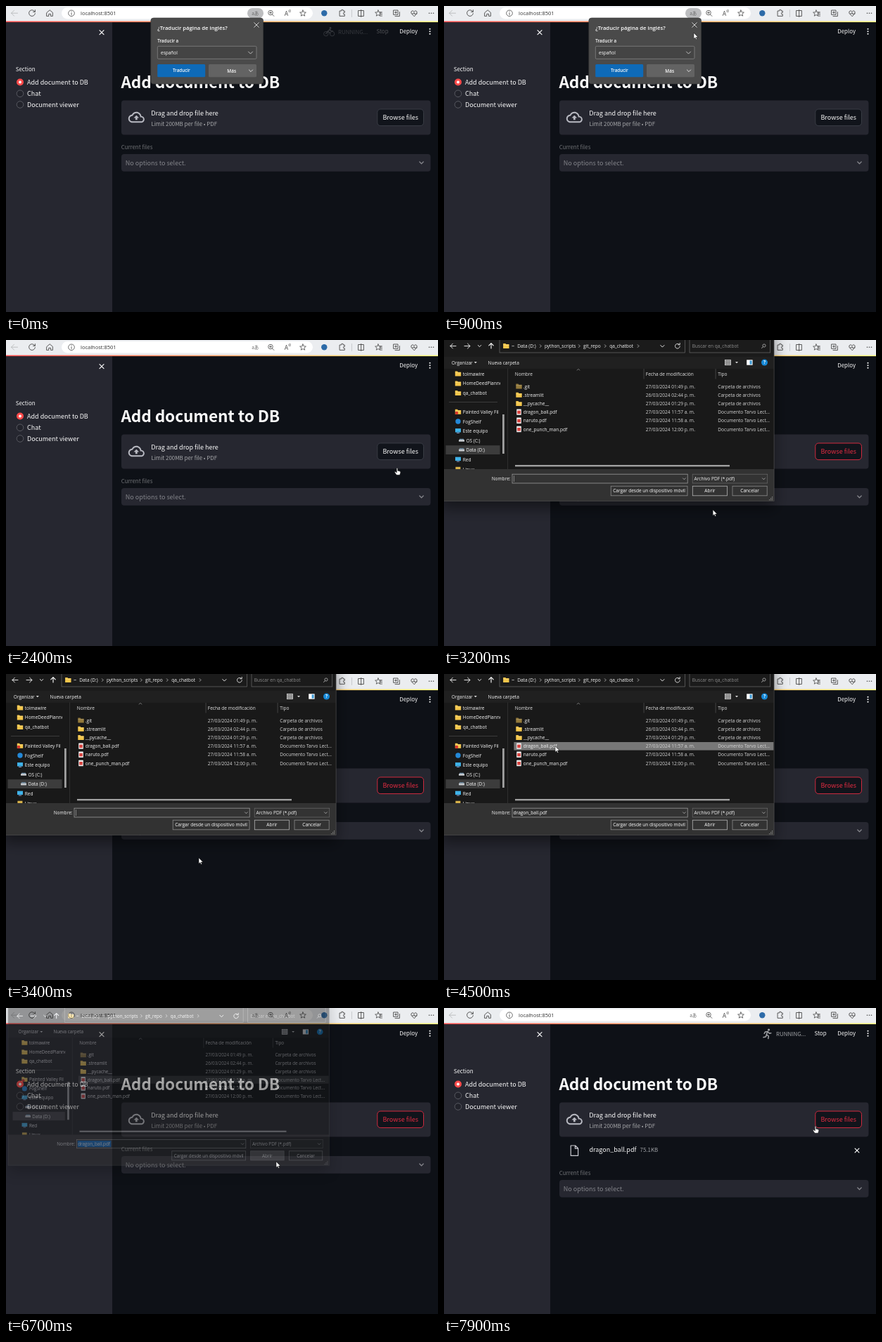
An HTML page for the animation above (8000 ms loop, 614 by 436 pixels).

```html
<!DOCTYPE html>
<html lang="es">
<head>
<meta charset="utf-8">
<title>Add document to DB</title>
<style>
html, body { margin: 0; width: 100%; height: 100%; overflow: hidden; background: #0e1117; }
svg { display: block; width: 614px; height: 436px; }
text { white-space: pre; }
.app { font-family: "Noto Sans CJK JP", "Noto Sans CJK SC", "Noto Sans CJK", "Noto Sans", sans-serif; }
.sys { font-family: "Open Sans", "Noto Sans", sans-serif; }
path { fill: none; stroke-linecap: round; stroke-linejoin: round; }
</style>
</head>
<body>
<svg id="stage" viewBox="0 0 614 436" xmlns="http://www.w3.org/2000/svg"></svg>
<script>
const LOOP = 8000, STEP = 100;
const RED = '#e62c42';
const stage = document.getElementById('stage');

// y is the middle of the capitals
const text = (x, y, size, str, fill = '#fafafa', more = '') =>
  `<text x="${x}" y="${(y + size * 0.36).toFixed(2)}" font-size="${size}" fill="${fill}" ${more}>${str}</text>`;
const rect = (x, y, w, h, fill, more = '') =>
  `<rect x="${x}" y="${y}" width="${w}" height="${h}" fill="${fill}" ${more}/>`;
const line = (d, stroke = '#fff', w = 0.9, more = '') =>
  `<path d="${d}" stroke="${stroke}" stroke-width="${w}" ${more}/>`;
const solid = (d, fill, more = '') => `<path d="${d}" style="fill:${fill}" ${more}/>`;
const disc = (x, y, r, fill, more = '') => `<circle cx="${x}" cy="${y}" r="${r}" fill="${fill}" ${more}/>`;
const ring = (x, y, r, stroke, w = 0.9) => disc(x, y, r, 'none', `stroke="${stroke}" stroke-width="${w}"`);
const group = (id, body, more = '') => `<g id="${id}" ${more}>${body}</g>`;
const chevron = (x, y, r = 2.4, c = '#fff', w = 0.9) => line(`M${x - r} ${y - r / 2}l${r} ${r} ${r}-${r}`, c, w);
const cross = (x, y, r, c = '#fff', w = 1) => line(`M${x - r} ${y - r}l${2 * r} ${2 * r}m0-${2 * r}l-${2 * r} ${2 * r}`, c, w);
const middle = 'text-anchor="middle"';

function browserBar() {
  const c = '#4a4a4a';
  const star = (x, y) => {
    let d = '';
    for (let i = 0; i < 10; i++) {
      const r = i % 2 ? 2.1 : 4.6, a = i * Math.PI / 5;
      d += `${i ? 'L' : 'M'}${(x + r * Math.sin(a)).toFixed(1)} ${(y - r * Math.cos(a)).toFixed(1)}`;
    }
    return line(d + 'z', c, 0.8);
  };
  return rect(0, 0, 614, 22, '#ebedf0') + rect(79, 2, 357, 16.5, '#fff', 'rx="8.2"') +
    line('M16.5 10.2H7.5m4-4l-4 4 4 4', '#b8babd') +
    line('M41 8.2a4.4 4.4 0 1 0 .4 2.4M41.4 5.6v2.8h-2.8', c) +
    line('M58 9.4l4.2-3.6 4.2 3.6v5h-2.8v-3h-2.8v3H58z', c) +
    ring(93, 10.3, 4.3, c, 0.8) + line('M93 10v2.4M93 8v.1', c) +
    text(106, 10.4, 7.5, 'localhost:8501', '#333', 'class="sys"') +
    group('badge', rect(343, 3, 23, 14.5, '#bcbdbf', 'rx="7.2"')) +
    text(354.2, 10.2, 6.4, 'aあ', '#666', `class="app" ${middle}`) +
    ring(376, 9.6, 3.3, c, 0.8) + line('M378.5 12.1l2.4 2.4M374.5 9.6h3M376 8.1v3', c, 0.8) +
    text(398.5, 10.8, 8.5, 'A', c, `class="sys" ${middle}`) + line('M402 6q1 1 0 2.2M403.6 5q1.6 1.8 0 4', c, 0.7) +
    star(422, 10.5) + disc(452.3, 10.3, 4.2, '#2d6ba8') +
    line('M474.5 7h2.2a1.3 1.3 0 1 1 2.4 0h2.2v2.4a1.3 1.3 0 1 0 0 2.4v2.6h-6.8z', c) +
    line('M491.5 5.5v10', '#c6c8ca') +
    line('M501 6.5h7.4v8H501zM504.7 5.5v10', c) +
    star(529, 10.5) + line('M531 9h3.6M531.6 11.5h3M532 14h2.6', c) +
    line('M551 6h6v6.4h-6zM553 14.6h6.4V8.6M552.6 9.2h2.8M554 7.8v2.8', c) +
    line('M580 14.6l-4-4.2q-1-3 1.6-3.6 1.6 0 2.4 1.6.8-1.6 2.4-1.6 2.6.6 1.6 3.6zM577 11h2l1-1.6 1.2 2.6.8-1h2', c) +
    [601.5, 604.5, 607.5].map(x => disc(x, 10.3, 0.8, c)).join('') +
    rect(0, 21.6, 614, 1.5, 'url(#deco)');
}

const option = (y, label, on) =>
  (on ? disc(20, y, 5, '#ff4b4b') + disc(20, y, 1.9, '#fff') : disc(20, y, 4.8, '#22232b', 'stroke="#65666e" stroke-width=".8"')) +
  text(30, y + 0.4, 9, label);

function running() {
  const c = '#a0a2a6';
  const bike = ring(454.8, 39.6, 3.2, c) + ring(463.6, 39.6, 3.2, c) +
    line('M454.8 39.6l2.6-4 3.4 3.4M457.4 35.6l3-2.4 1.6 2.4h2.4', c, 1.2) + disc(461, 31.4, 1.4, c);
  const runner = disc(461.6, 31, 1.6, c) +
    line('M460 33.2l-1.6 4.6 3 2.2-.6 3.6M458.4 37.8l-1 3.2-3.4.8M460 33.6l-3.4.4-1.4 2.4M460.6 34l1.8 2.2 2.4-.4', c, 1.5);
  return group('bike', bike) + group('runner', runner) +
    text(472, 36.7, 7.9, 'RUNNING...', c) + text(526.5, 36.6, 7.9, 'Stop');
}

function page() {
  const cloud = 'M19.35 10.04C18.67 6.59 15.64 4 12 4 9.11 4 6.6 5.64 5.35 8.04 2.34 8.36 0 10.91 0 14c0 3.31 2.69 6 6 6h13c2.76 0 5-2.24 5-5 0-2.64-2.05-4.78-4.65-4.96zM19 18H6c-2.21 0-4-1.79-4-4 0-2.05 1.53-3.76 3.56-3.97l1.07-.11.5-.95C8.08 7.14 9.94 6 12 6c2.62 0 4.88 1.86 5.39 4.43l.3 1.5 1.53.11c1.56.1 2.78 1.41 2.78 2.96 0 1.65-1.35 3-3 3zM8 13h2.55v3h2.9v-3H16l-4-4z';
  return rect(0, 22, 614, 414, '#0e1117') + rect(0, 22, 151, 414, '#262730') +
    cross(136, 37.6, 3, '#fafafa', 1.2) + text(13.8, 90.4, 7.9, 'Section') +
    option(108.5, 'Add document to DB', true) + option(124.8, 'Chat') + option(140.5, 'Document viewer') +
    group('running', running()) + text(559.3, 36.6, 7.9, 'Deploy') +
    [32.8, 36.3, 39.8].map(y => disc(602.5, y, 1.05, '#fafafa')).join('') +
    text(163.4, 109.2, 22.6, 'Add document to DB', '#fafafa', 'font-weight="700" letter-spacing="-.11"') +
    rect(164, 134.5, 439.5, 49, '#262730', 'rx="4"') +
    solid(cloud, '#b9bac2', 'transform="translate(173.8 147) scale(.96)"') +
    text(206.3, 152.4, 9, 'Drag and drop file here') +
    text(206.4, 168.6, 7.9, 'Limit 200MB per file • PDF', '#a5a6a9') +
    rect(527.8, 147, 65.7, 23.6, '#11141b', 'id="browse" rx="4.5" stroke-width=".9"') +
    text(560.7, 159, 9.05, 'Browse files', '#fafafa', `id="browseLabel" ${middle}`) +
    group('file',
      line('M180.2 196h6.4l4 4v10.4h-10.4zM186.4 196v4.2h4.2', '#c9cad0', 1.2) +
      text(206.4, 202, 9, 'dragon_ball.pdf') +
      group('size', text(278.6, 202.4, 7.9, '75.1KB', '#a0a2a6')) +
      group('progress', rect(206.5, 210, 386, 2.4, '#262730', 'rx="1.2"') +
        rect(206.5, 210, 386, 2.4, '#ff4b4b', 'id="bar" rx="1.2"')) +
      cross(587, 203, 2.9, '#fafafa', 1.2)) +
    group('current',
      text(163.7, 201.2, 7.9, 'Current files', '#6f7175') +
      rect(164, 211, 439.5, 24.7, '#262730', 'rx="4"') +
      text(169.8, 223.5, 9, 'No options to select.', '#83848a') + chevron(590.5, 223.4, 2.7, '#84858b', 1.3));
}

function popup() {
  return rect(205.8, 17, 159.8, 94, '#4a4a4a', 'rx="4" stroke="#383838" stroke-width=".6"') +
    text(215.3, 31, 7.7, '¿Traducir página de inglés?', '#fff', 'font-weight="600"') +
    cross(356, 27, 3.3, '#f0f0f0', 0.8) +
    text(215.3, 49.3, 6.2, 'Traducir a', '#fff', 'font-weight="600"') +
    rect(215.3, 57.3, 140.7, 18, '#444', 'rx="1.5" stroke="#8d8d8d" stroke-width=".7"') +
    text(220, 66.4, 6.5, 'español', '#fff') + chevron(347.5, 66.6, 3, '#ddd', 0.8) +
    rect(215.2, 83, 68, 18.3, '#0e6ab8', 'rx="1.5"') + rect(288, 83, 68, 18.3, '#636363', 'rx="1.5"') +
    text(249.3, 92.2, 6.25, 'Traducir', '#fff', `font-weight="600" ${middle}`) +
    text(320.7, 92.2, 6.4, 'Más', '#fff', `font-weight="600" ${middle}`) + chevron(348, 92.3, 2.6, '#fff', 0.8);
}

const F = 6.55;
const label = (x, y, s, fill = '#f4f4f4', more = '') => text(x, y, F, s, fill, more);
const folder = (x, y, c = '#f3c64b') =>
  solid(`M${x - 4.2} ${y - 3.4}h3.2l1 1.2h4.2v5.8h-8.4z`, c) + rect(x - 4.2, y - 1.4, 8.4, 0.6, '#fff', 'opacity=".35"');
const rowY = i => 66 + i * 12.2;
const rowTop = i => rowY(i) - 5.6;

const FILES = [
  ['.git', '27/03/2024 01:49 p. m.'],
  ['.streamlit', '26/03/2024 02:44 p. m.'],
  ['__pycache__', '27/03/2024 01:29 p. m.'],
  ['dragon_ball.pdf', '27/03/2024 11:57 a. m.'],
  ['naruto.pdf', '27/03/2024 11:58 a. m.'],
  ['one_punch_man.pdf', '27/03/2024 12:00 p. m.']
];

function fileRow([name, date], i) {
  const y = rowY(i), pdf = i > 2;
  const sheet = rect(103.2, y - 4.2, 6.6, 8.4, '#f2f2f2', 'rx=".5"') + rect(104.2, y - 2, 4.6, 4.6, '#d9433f');
  return (pdf ? sheet : folder(106.5, y, i ? '#f3c64b' : '#93793a')) +
    label(112.8, y + 0.3, name) + label(286.8, y + 0.3, date, '#d6d6d6') +
    label(389.3, y + 0.3, pdf ? 'Documento Tarvo Lect...' : 'Carpeta de archivos', '#d6d6d6');
}

function places() {
  const screen = (x, y) => rect(x - 4, y - 3.3, 8, 5.4, '#3fb2e8') + rect(x - 2, y + 2.6, 4, 0.9, '#9ad');
  const drive = (x, y) => rect(x - 4, y - 1, 8, 2.8, '#c4c8cc', 'rx=".6"') + rect(x - 3, y - 2.2, 6, 1, '#7fa9c9');
  return folder(20, 48) + label(26.8, 48.2, 'tolmawire') +
    folder(20, 61.8) + label(26.8, 62, 'HomeDeedPlanner') +
    folder(20, 75.4) + label(26.8, 75.6, 'qa_chatbot') +
    rect(7, 88.3, 69, 0.7, '#4a4a4a') +
    folder(20, 102.2) + disc(18, 104, 2.2, '#d8352c') + label(26.8, 102.4, 'Painted Valley Fil') +
    disc(20, 116, 3.7, '#2489d8') + label(26.8, 116.2, 'FogShelf') +
    screen(20, 129.4) + label(26.8, 129.6, 'Este equipo') +
    drive(25, 143) + label(31.4, 143.2, 'OS (C:)') +
    rect(2.5, 150.2, 77, 12.8, '#3c3c3c') + drive(25, 156.6) + label(31.4, 156.8, 'Data (D:)') +
    screen(20, 170) + label(26.8, 170.4, 'Red') +
    rect(16.4, 180.8, 7, 7, '#d8b24a') + label(26.8, 184.4, 'Linux');
}

function dialog() {
  const edge = 'stroke="#6a6a6a" stroke-width=".7"';
  const crumb = x => line(`M${x} 6.8l1.8 1.8-1.8 1.8`, '#ccc', 0.8);
  const button = (x, w, s, id) => rect(x, 208.2, w, 13.6, '#333', `id="${id}" stroke="#8c8c8c" stroke-width=".8"`) +
    label(x + w / 2, 215.1, s, '#fff', middle);
  return rect(-4, -20, 473, 249.3, '#313131', 'stroke="#4b4b4b" stroke-width=".8" filter="url(#shadow)"') +
    rect(-4, -20, 472.6, 44, '#1b1b1b') + rect(-4, 24, 472.6, 16.5, '#202020') +
    rect(-4, 40.5, 472.6, 143.5, '#191919') +
    line('M17 8.6H9m3.4-3.4L9 8.6l3.4 3.4') + line('M29 8.6h8m-3.4-3.4L37 8.6l-3.4 3.4') +
    chevron(50.5, 8.6, 2.2) + line('M67 12V4.6m-3.2 3.2L67 4.6l3.2 3.2', '#fff', 1.1) +
    rect(79, -6, 263.4, 24, '#1b1b1b', edge) + rect(349, -6, 114.7, 24, '#1b1b1b', edge) +
    folder(88.3, 8.3) + line('M96.8 8.6h2.6', '#ccc', 0.8) +
    label(104.2, 8.5, 'Data (D:)') + crumb(136.4) + label(142.9, 8.5, 'python_scripts') + crumb(191.4) +
    label(198, 8.5, 'git_repo') + crumb(228.4) + label(235.2, 8.5, 'qa_chatbot') + crumb(275.2) +
    chevron(310.4, 8.8, 2.6) + line('M334.4 6.4a3.4 3.4 0 1 0 .9 2.6M335.2 4.4v2.4h-2.4', '#fff', 0.8) +
    label(352.8, 8.5, 'Buscar en qa_chatbot', '#8c8c8c') +
    ring(455, 8, 2.1, '#b5b5b5', 0.8) + line('M453.5 9.6l-2 2', '#b5b5b5') +
    label(10.8, 32.2, 'Organizar') + solid('M42.8 31h4l-2 2.2z', '#ddd') + label(62.6, 32.2, 'Nueva carpeta') +
    rect(399.5, 28.3, 8, 7.4, '#777', 'stroke="#eee" stroke-width=".7"') +
    line('M400.5 30.8h6M400.5 33.2h6', '#eee', 0.6) + solid('M414 31h4l-2 2.2z', '#ddd') +
    rect(430.2, 28.3, 8.4, 7.4, '#fff') + rect(434.6, 29.3, 3, 5.4, '#3d9bd6') +
    disc(455.5, 32, 4.5, '#1588d6') + label(455.5, 32.1, '?', '#fff', `font-weight="700" ${middle}`) +
    group('places', places(), 'clip-path="url(#pane)"') +
    rect(83, 106, 2.8, 56, '#a0a0a0') + rect(90, 40.5, 0.8, 143.5, '#343434') +
    line('M189 43l2-1.6 2 1.6', '#999', 0.7) +
    label(100.8, 48.6, 'Nombre', '#e4e4e4') + label(286.8, 48.6, 'Fecha de modificación', '#e4e4e4') +
    label(389.3, 48.6, 'Tipo', '#e4e4e4') +
    rect(283.7, 41, 0.7, 14.5, '#555') + rect(385.7, 41, 0.7, 14.5, '#555') +
    rect(99.4, 0, 369, 11.6, '#454545', 'id="hover"') +
    rect(99.4, rowTop(3), 369, 11.6, '#777', 'id="picked"') +
    FILES.map(fileRow).join('') +
    rect(101, 178, 305, 2.4, '#a0a0a0') +
    label(94.6, 197.7, 'Nombre:', '#f4f4f4', 'text-anchor="end"') +
    rect(97, 191.2, 249.2, 12.8, '#333', 'stroke="#9a9a9a" stroke-width=".8"') +
    rect(98.2, 192.8, 49.4, 9.6, '#0f6fc6', 'id="marked"') +
    group('name', label(98.6, 197.7, 'dragon_ball.pdf', '#fff')) + rect(99, 193.2, 0.5, 8.8, '#ccc', 'id="caret"') +
    chevron(341.4, 197.8, 1.9, '#ccc', 0.7) +
    rect(353.2, 191.2, 106.5, 12.8, '#333', edge) + label(355.6, 197.7, 'Archivo PDF (*.pdf)') +
    chevron(454.4, 197.8, 1.9, '#ccc', 0.7) +
    button(237.2, 108.8, 'Cargar desde un dispositivo móvil', 'load') +
    button(353.3, 49.2, 'Abrir', 'open') + button(410, 49.2, 'Cancelar', 'cancel') +
    [0, 1, 2].map(i => [...Array(i + 1)].map((_, j) => rect(466 - j * 2, 223.2 + i * 2, 1.1, 1.1, '#999')).join('')).join('');
}

stage.innerHTML = `<defs>
  <linearGradient id="deco"><stop stop-color="#ff4b4b"/><stop offset="1" stop-color="#fffd80"/></linearGradient>
  <filter id="shadow" filterUnits="userSpaceOnUse" x="-60" y="-60" width="620" height="370">
    <feDropShadow dx="0" dy="10" stdDeviation="10" flood-color="#000" flood-opacity=".45"/></filter>
  <clipPath id="pane"><rect x="0" y="40" width="80" height="144"/></clipPath></defs>` +
  group('page', page(), 'class="app"') + browserBar() +
  group('popup', popup(), 'class="sys"') + group('dialog', dialog(), 'class="sys"') +
  group('arrow', solid('M0 0V8.3L1.9 6.5 3.2 9.3 4.5 8.7 3.2 6H5.9Z', '#fff', 'stroke="#111" stroke-width=".5"')) +
  group('hand', solid('M-.8.8Q0-.6.8.8V4l1.2.2 1.2.3 1.2.6.4 1-.6 2.3-.6 1.6H-1L-3.4 6.4q-.4-1.4.8-1L-.8 6.4Z', '#fff', 'stroke="#111" stroke-width=".5"'));

const el = id => document.getElementById(id);
const set = (id, name, value) => el(id).setAttribute(name, value);
const show = (id, alpha) => {
  set(id, 'display', alpha > 0 ? 'inline' : 'none');
  set(id, 'opacity', Number(alpha));
};
const clamp = v => Math.min(1, Math.max(0, v));

// time, x, y of the pointer tip
const PATH = [
  [100, 42, 171], [300, 150, 120], [700, 350, 46], [900, 355, 38.5], [1000, 356, 28], [1200, 356, 27],
  [1500, 250, 96], [1800, 153, 148], [2000, 215, 107], [2200, 400, 205], [2400, 556, 182.3], [2600, 561, 161],
  [2800, 561, 161], [3100, 420, 235], [3400, 274, 262], [3500, 272, 265], [3600, 268, 248], [4300, 159, 108],
  [4500, 158, 103], [4800, 158, 103], [5400, 286, 211], [5800, 335, 247], [6100, 384, 219], [6700, 384, 219],
  [7100, 410, 204], [7500, 518, 182], [7900, 528, 168.3]
];

function pointer(t) {
  let i = 0;
  while (i < PATH.length - 2 && t >= PATH[i + 1][0]) i++;
  const [t0, x0, y0] = PATH[i], [t1, x1, y1] = PATH[i + 1];
  const k = clamp((t - t0) / (t1 - t0)), e = k * k * (3 - 2 * k);
  return [x0 + (x1 - x0) * e, y0 + (y1 - y0) * e];
}

function draw(t) {
  const [x, y] = pointer(t);
  const hand = (t >= 2300 && t < 2900) || t >= 7600;
  const at = `translate(${x.toFixed(2)} ${y.toFixed(2)})`;
  set('arrow', 'transform', at);
  set('hand', 'transform', at);
  show('arrow', t >= 100 && !hand);
  show('hand', hand);

  const popAlpha = clamp((1300 - t) / 200);
  show('popup', popAlpha);
  show('badge', popAlpha);

  const done = t >= 7500;
  show('running', done ? clamp((t - 7300) / 400) : 0.27 * clamp(1 - t / 200));
  show('bike', t < 7700);
  show('runner', t >= 7700);

  const red = t >= 2600;
  set('browse', 'stroke', red ? RED : '#3d4049');
  set('browseLabel', 'fill', red ? RED : '#fafafa');

  const added = t >= 7200;
  show('file', added);
  show('size', done);
  show('progress', !done);
  set('bar', 'width', 386 * clamp((t - 7100) / 400));
  set('current', 'transform', `translate(0 ${added ? 34 : 0})`);

  const opening = clamp((t - 2700) / 200), closing = t >= 6700;
  show('dialog', t >= 6800 ? 0 : closing ? 0.42 : opening);
  const shrink = closing ? 1 : 1 - opening;
  const scale = 1 - 0.036 * shrink;
  set('dialog', 'transform', `translate(${7.1 * shrink} ${3.1 * shrink}) scale(${scale})`);

  const picked = t >= 4400, pressed = t >= 6300;
  const row = Math.round((y - rowY(0)) / 12.2);
  show('hover', t > 3600 && x > 99 && x < 468 && row >= 0 && row < 6 && !(picked && row === 3));
  set('hover', 'y', rowTop(row));
  show('picked', picked);
  set('picked', 'fill', pressed ? '#3a3a3a' : '#777');
  show('name', picked);
  show('marked', pressed);
  show('caret', !picked && t % 1000 < 500);

  const over = (x0, x1) => t < 6800 && y > 208 && y < 222 && x > x0 && x < x1;
  set('load', 'fill', over(237, 346) ? '#454545' : '#333');
  set('open', 'fill', pressed ? '#666' : over(353, 402) ? '#454545' : '#333');
  set('open', 'stroke', pressed ? '#888' : '#b4b4b4');
}

const start = performance.now();
function tick() {
  const t = (performance.now() - start) % LOOP;
  draw(Math.floor(t / STEP) * STEP);
  requestAnimationFrame(tick);
}
tick();
</script>
</body>
</html>
```
